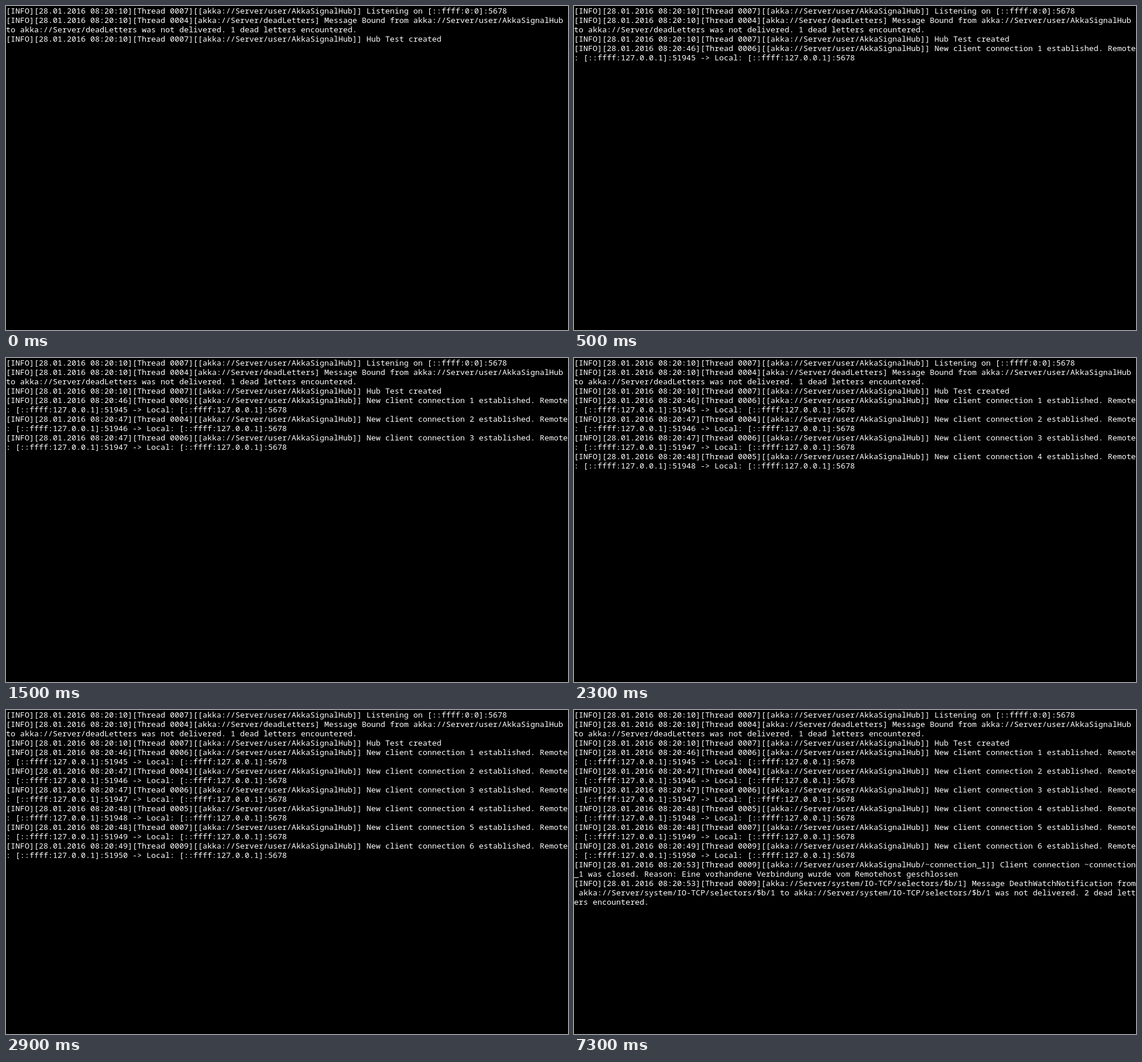
Animation of 960 by 554 pixels, one loop 8000 ms. Source, as an HTML page:

```html
<!DOCTYPE html>
<html lang="en">
<head>
<meta charset="utf-8">
<title>Server log</title>
<style>
html, body { margin: 0; width: 100%; height: 100%; overflow: hidden; background: #000; }
pre {
  margin: 0;
  color: #fff;
  font: 13.3333px/16px "Noto Sans Mono", "DejaVu Sans Mono", monospace;
  font-variant-ligatures: none;
}
</style>
</head>
<body>
<pre id="log"></pre>
<script>
const LOOP = 8000, COLUMNS = 120;
const HUB = 'akka://Server/user/AkkaSignalHub';
const DEAD = 'akka://Server/deadLetters';
const SELECTOR = 'akka://Server/system/IO-TCP/selectors/$b/1';
const events = [];

function log(at, second, thread, actor, message) {
  const line = `[INFO][28.01.2016 08:20:${second}][Thread 000${thread}][${actor}] ${message}`;
  // The console wraps hard at its last column.
  const rows = line.match(new RegExp(`.{1,${COLUMNS}}`, 'g'));
  events.push({ at, text: rows.join('\n') });
}

const undelivered = (what, from, to, count) =>
  `Message ${what} from ${from} to ${to} was not delivered. ${count} dead letters encountered.`;

log(0, 10, 7, `[${HUB}]`, 'Listening on [::ffff:0:0]:5678');
log(0, 10, 4, DEAD, undelivered('Bound', HUB, DEAD, 1));
log(0, 10, 7, `[${HUB}]`, 'Hub Test created');

// Time in the loop, second on the log's clock, thread
[[500, 46, 6], [1100, 47, 4], [1500, 47, 6], [2300, 48, 5], [2700, 48, 7], [2900, 49, 9]]
  .forEach(([at, second, thread], i) => log(at, second, thread, `[${HUB}]`,
    `New client connection ${i + 1} established. ` +
    `Remote: [::ffff:127.0.0.1]:${51945 + i} -> Local: [::ffff:127.0.0.1]:5678`));

log(7300, 53, 9, `[${HUB}/~connection_1]`, 'Client connection ~connection_1 was closed. ' +
  'Reason: Eine vorhandene Verbindung wurde vom Remotehost geschlossen');
log(7300, 53, 9, SELECTOR, undelivered('DeathWatchNotification', SELECTOR, SELECTOR, 2));

const screen = document.getElementById('log');
const start = performance.now();
let shown = 0;

function draw() {
  const time = (performance.now() - start) % LOOP;
  const visible = events.filter(event => event.at <= time);
  if (visible.length !== shown) {
    shown = visible.length;
    screen.textContent = visible.map(event => event.text).join('\n');
  }
  requestAnimationFrame(draw);
}
draw();
</script>
</body>
</html>
```
